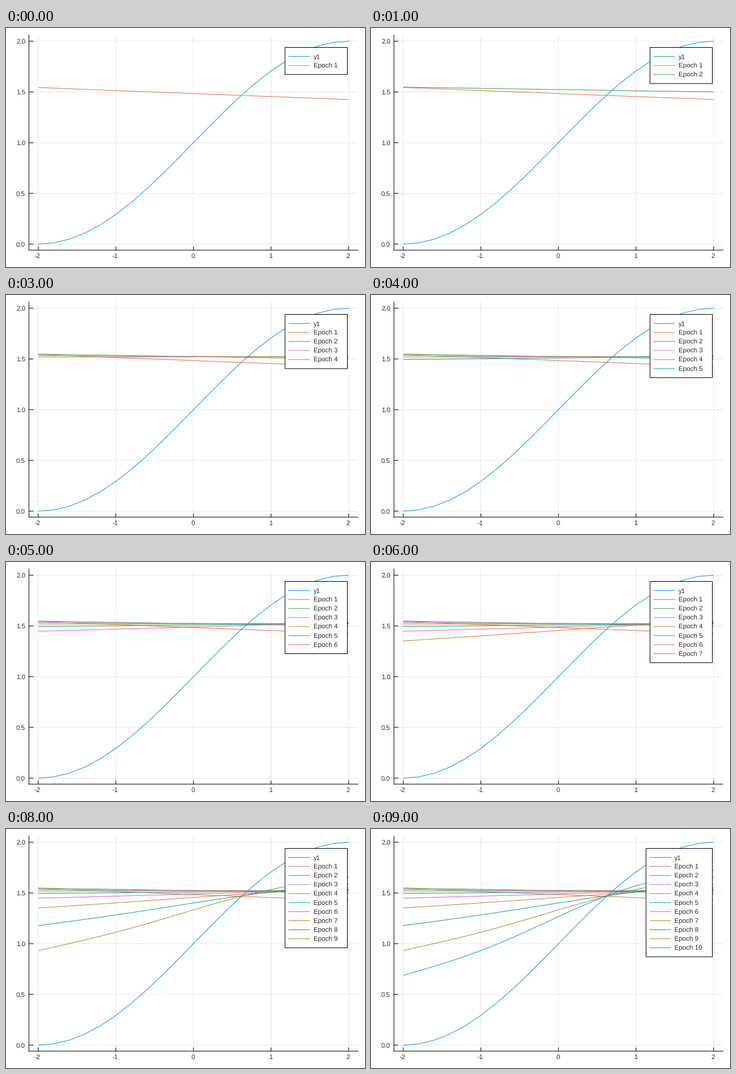
Recreate the animation shown at these times as a matplotlib script. Size 600x400 px, loop 10 s.

```python
import numpy as np
import matplotlib.pyplot as plt
from matplotlib.animation import FuncAnimation
from matplotlib.patches import Rectangle

plt.rcParams["path.snap"] = False
plt.rcParams["text.hinting"] = "none"

W, H, DPI = 600, 400, 100
PX = 72 / DPI  # points per pixel
EPOCHS = 10

COLORS = ["#009afa", "#e36f47", "#3ea44e", "#c371d2", "#ac8e18", "#00aaae",
          "#ed5e93", "#c68225", "#00a98d", "#8e971e", "#009fdc"]
INK = "#2b2b2b"
GRID = "#e5e5e5"

LEFT, RIGHT, TOP, BOTTOM = 38.3, 588.3, 11.8, 371.8
ROW = 15.12
BOX_TOP, BOX_RIGHT = 32.5, 570.5


def to_x(x):
    return 313.3 + 129.7 * x


def to_y(y):
    return 361.7 - 169.8 * y


def surge(epoch, size, rate, middle):
    return size / (1 + np.exp(-rate * (epoch - middle)))


def fit(epoch, x):
    """Model output: a flat line that settles, then bends towards the sine."""
    base = 1.53 - 0.045 * 0.1 ** (epoch - 1)
    tilt = 0.06 * 0.42 ** (epoch - 1)
    drop = surge(epoch, 1.2, 0.867, 9.01)
    left = base + tilt - drop
    mid = base - surge(epoch, 0.38, 0.74, 8.9)
    right = base - tilt + surge(epoch, 0.26, 1.16, 9.06)
    slope = (right - left) / 4
    bend = (left + right - 2 * mid) / 8
    wave = 0.085 * drop ** 2 * np.sin(np.pi * x / 2)
    return mid + slope * x + bend * x ** 2 + wave


fig = plt.figure(figsize=(W / DPI, H / DPI), dpi=DPI, facecolor="white")
ax = fig.add_axes([0, 0, 1, 1])
ax.set_xlim(0, W)
ax.set_ylim(H, 0)
ax.axis("off")


def line(xs, ys, color="black", z=1, cap="butt"):
    return ax.plot(xs, ys, color=color, lw=PX, zorder=z,
                   solid_capstyle=cap)[0]


def label(x, y, text, align="left", z=1):
    return ax.text(x, y, text, ha=align, va="baseline", fontsize=11 * PX,
                   family="Liberation Sans", color=INK, zorder=z)


# Grid, ticks and axes
for v in range(-2, 3):
    x = to_x(v)
    line([x, x], [TOP, BOTTOM], GRID, z=0)
    line([x, x], [BOTTOM, BOTTOM - 6])
    label(x - 1, 385, str(v), "center")
for v in np.arange(0, 2.1, 0.5):
    y = to_y(v)
    line([LEFT, RIGHT], [y, y], GRID, z=0)
    line([LEFT, LEFT + 7.5], [y, y])
    label(32.3, y + 4.2, f"{v:.1f}", "right")
line([LEFT, LEFT], [TOP, BOTTOM], cap="projecting")
line([LEFT, RIGHT], [BOTTOM, BOTTOM], cap="projecting")

# Curves
xs = np.linspace(-2, 2, 21)
curves = [1 + np.sin(np.pi * xs / 4)]
curves += [fit(n, xs) for n in range(1, EPOCHS + 1)]
plots = [line(to_x(xs), to_y(ys), color, z=2)
         for ys, color in zip(curves, COLORS)]

# Legend
box = ax.add_patch(Rectangle((0, 0), 1, 1, fc="white", ec="black",
                             lw=PX, zorder=5))
names = ["y1"] + [f"Epoch {n}" for n in range(1, EPOCHS + 1)]
keys, texts = [], []
for i, (name, color) in enumerate(zip(names, COLORS)):
    y = BOX_TOP + ROW * (i + 1)
    keys.append(line([0, 1], [y, y], color, z=6))
    texts.append(label(0, y + 4, name, z=6))


def update(frame):
    shown = frame + 2
    left = BOX_RIGHT - 58 - 6.6 * len(names[shown - 1])
    box.set_bounds(left, BOX_TOP, BOX_RIGHT - left, ROW * (shown + 1))
    for i, (plot, key, text) in enumerate(zip(plots, keys, texts)):
        for artist in (plot, key, text):
            artist.set_visible(i < shown)
        key.set_xdata([left + 5.8, left + 41.8])
        text.set_x(left + 47.6)
    return [box, *plots, *keys, *texts]


anim = FuncAnimation(fig, update, frames=EPOCHS, interval=1000,
                     init_func=lambda: update(0), repeat=True,
                     repeat_delay=0, blit=False)
plt.show()
```
